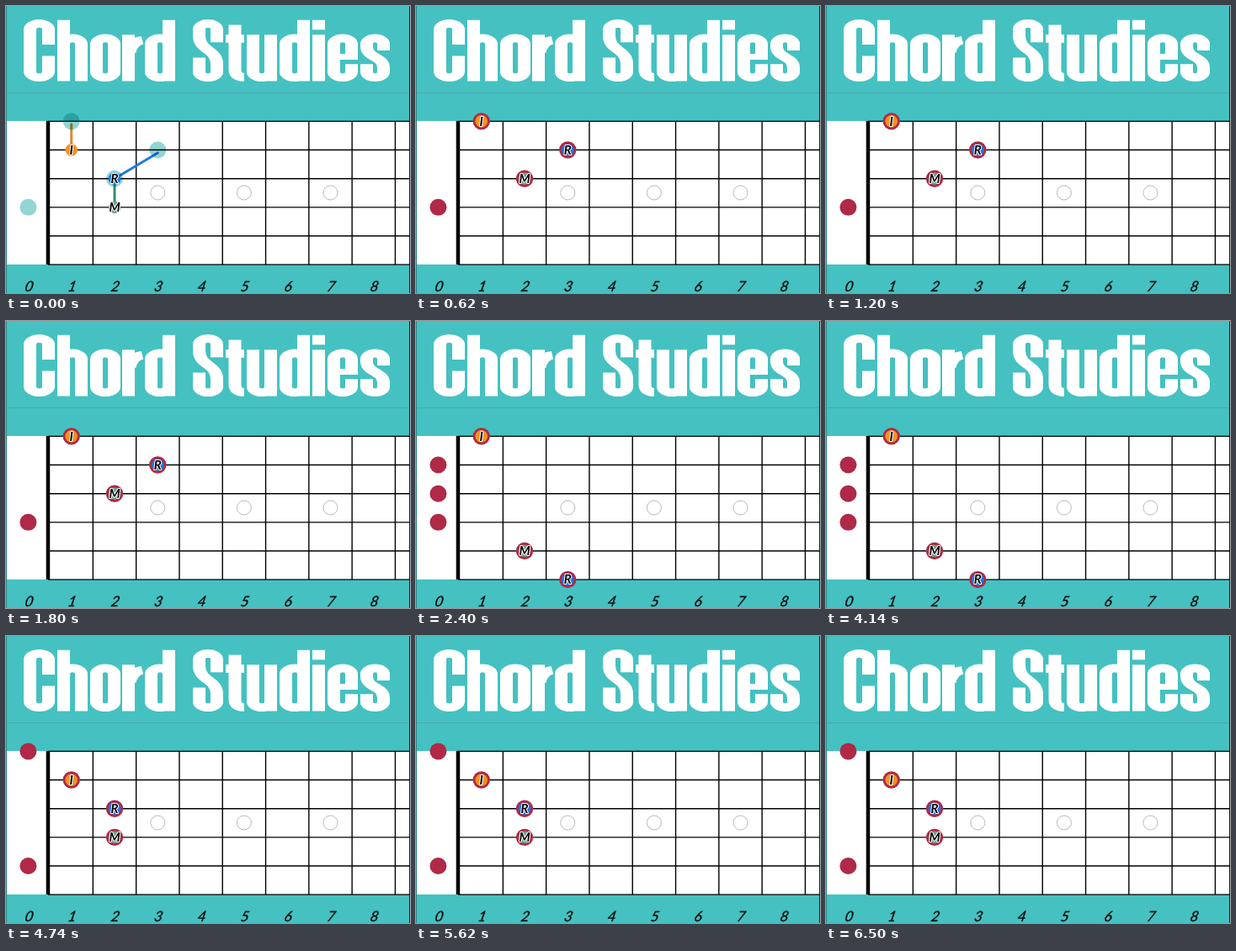
An HTML page that plays this animation: 480x342 px, repeating every 6.68 s.

```html
<!DOCTYPE html>
<html lang="en">
<head>
<meta charset="utf-8">
<title>Chord Studies</title>
<style>
  html, body { margin: 0; width: 100%; height: 100%; overflow: hidden; background: #45c1c1; }
  svg { display: block; width: 480px; height: 342px; }
  .title { fill: none; stroke: #fff; stroke-width: 15; }
  .frets { fill: none; stroke: #000; stroke-width: 1.4; }
  .inlay { fill: #fff; stroke: #b9b9b9; stroke-width: 1; }
  .number { font: italic 17px Lato, "Liberation Sans", sans-serif; text-anchor: middle;
            fill: #111; stroke: #111; stroke-width: .4; }
  .finger { font: italic 700 15px Lato, "Liberation Sans", sans-serif; text-anchor: middle;
            fill: #000; stroke: #fff; stroke-width: 2; stroke-linejoin: round; paint-order: stroke; }
  .red { fill: #b02946; }
  .ghost { fill: #92d5d3; mix-blend-mode: multiply; }
  .path { stroke-width: 3; stroke-linecap: round; }
  .scene { visibility: hidden; }
</style>
</head>
<body>
<svg id="stage" viewBox="0 0 480 342" xmlns="http://www.w3.org/2000/svg">
  <rect width="480" height="342" fill="#45c1c1"/>
  <path d="M0 103.5H480" stroke="#4aa9b2" stroke-width="1"/>
  <g id="title" class="title" role="img" aria-label="Chord Studies" transform="translate(0 16) scale(1 .65)"></g>
  <rect y="137" width="480" height="171" fill="#fff"/>
  <path d="M.5 0V342" stroke="#2f8587" stroke-width="1"/>
  <path d="M479.5 0V342" stroke="#222" stroke-width="1"/>
  <path id="frets" class="frets"/>
  <rect x="47.7" y="137" width="4.5" height="171"/>
  <g id="marks"></g>
  <g id="scenes"></g>
</svg>
<script>
const $ = id => document.getElementById(id);
const fretX = n => 26.4 + 51.3 * n;
const stringY = n => 137.4 + 34.15 * (n - 1);

// Condensed lettering from thick strokes; the group's vertical scale thins the horizontals
const glyphs = {
  C: 'M29.5 46V18.5a11 11 0 0 0-22 0V95.5a11 11 0 0 0 22 0V67',
  h: 'M7.5 1V113M7.5 45a10.5 10.5 0 0 1 21 0V113',
  o: 'M7.5 45a10.5 10.5 0 0 1 21 0V96a10.5 10.5 0 0 1-21 0z',
  r: 'M7.5 28V113M9 60Q12 40 24 38',
  d: 'M28.5 1V113M28.5 45a10.5 10.5 0 0 0-21 0V96a10.5 10.5 0 0 0 21 0',
  S: 'M28.5 42V18a10.5 10.5 0 0 0-21 0V30C7.5 58 28.5 54 28.5 82V96a10.5 10.5 0 0 1-21 0V70',
  t: 'M11 10V92Q11 106 22 106M0 35H22',
  u: 'M7.5 28V96a10.5 10.5 0 0 0 21 0M28.5 28V113',
  i: 'M7.5 28V113M7.5 1V19',
  e: 'M28.5 82V96a10.5 10.5 0 0 1-21 0V45a10.5 10.5 0 0 1 21 0V74M18 63V74',
  s: 'M27.5 57V44.5a10 10 0 0 0-20 0V50C7.5 70 27.5 68 27.5 88V96.5a10 10 0 0 1-20 0V82'
};
const words = [
  ['Chord', [21, 61, 100, 138, 165]],
  ['Studies', [222, 261, 286, 325, 364, 382, 421]]
];
$('title').innerHTML = words.map(([word, xs]) => [...word].map((c, i) =>
  `<path transform="translate(${xs[i]})" d="${glyphs[c]}"/>`
).join('')).join('');

// Fretboard
let grid = '';
for (let s = 1; s <= 6; s++) grid += `M50 ${stringY(s)}H480`;
for (let f = 1; f <= 8; f++) grid += `M${fretX(f + .5)} 137V308`;
$('frets').setAttribute('d', grid);

let marks = '';
for (const f of [3, 5, 7]) marks += `<circle class="inlay" cx="${fretX(f)}" cy="222.5" r="8.5"/>`;
for (let f = 0; f <= 8; f++) {
  marks += `<text class="number" transform="translate(${fretX(f)} 340) skewX(-12)">${f}</text>`;
}
$('marks').innerHTML = marks;

// Fingers are [fret, string]; open lists the ringing open strings
const colors = {
  I: { disc: '#f7911e', line: '#e2893a' },
  R: { disc: '#1d78e6', line: '#1d78e6' },
  M: { disc: '#6f9f8a', line: '#2f8f6c' }
};
const chords = {
  Am: { I: [1, 2], R: [2, 3], M: [2, 4], open: [1, 5] },
  Dm: { I: [1, 1], R: [3, 2], M: [2, 3], open: [4] },
  G7: { I: [1, 1], R: [3, 6], M: [2, 5], open: [2, 3, 4] }
};
const names = Object.keys(colors);
const spot = ([fret, string]) => [fretX(fret), stringY(string)];
const disc = ([x, y], r, attrs) => `<circle cx="${x}" cy="${y}" r="${r}" ${attrs}/>`;

const finger = (name, place) => {
  const [x, y] = spot(place);
  return disc([x, y], 7.3, `fill="${colors[name].disc}"`) +
    `<text class="finger" x="${x}" y="${y + 5.3}">${name}</text>`;
};

const hold = chord =>
  chord.open.map(s => disc(spot([0, s]), 10, 'class="red"')).join('') +
  names.map(n => disc(spot(chord[n]), 10.2, 'class="red"') + finger(n, chord[n])).join('');

// Lines lead from the held places to the next ones and stop just short of them
const change = (from, to) => {
  const lines = names.map(n => {
    const [x1, y1] = spot(from[n]), [x2, y2] = spot(to[n]);
    const end = y2 + 3.5 * Math.sign(y1 - y2);
    return `<line class="path" stroke="${colors[n].line}" x1="${x1}" y1="${y1}" x2="${x2}" y2="${end}"/>`;
  }).join('');
  const ghosts = [...names.map(n => to[n]), ...to.open.map(s => [0, s])]
    .map(p => disc(spot(p), 10, 'class="ghost"')).join('');
  return lines + ghosts + names.map(n => finger(n, from[n])).join('');
};

const { Am, Dm, G7 } = chords;
const loop = 6680;
const scenes = [
  [0, change(Am, Dm)],
  [20, hold(Dm)],
  [2100, change(Dm, G7)],
  [2400, hold(G7)],
  [4440, change(G7, Am)],
  [4740, hold(Am)]
];

// One stepped visibility animation per scene
let css = '';
$('scenes').innerHTML = scenes.map(([start, body], i) => {
  const end = i + 1 < scenes.length ? scenes[i + 1][0] : loop;
  const pct = t => (t / loop * 100).toFixed(5) + '%';
  css += `@keyframes show${i} { 0% { visibility: hidden } ` +
    `${pct(start)} { visibility: visible } ${pct(end)} { visibility: hidden } }\n`;
  return `<g class="scene" style="animation: show${i} ${loop}ms step-end infinite">${body}</g>`;
}).join('');
document.head.appendChild(document.createElement('style')).textContent = css;
</script>
</body>
</html>
```
